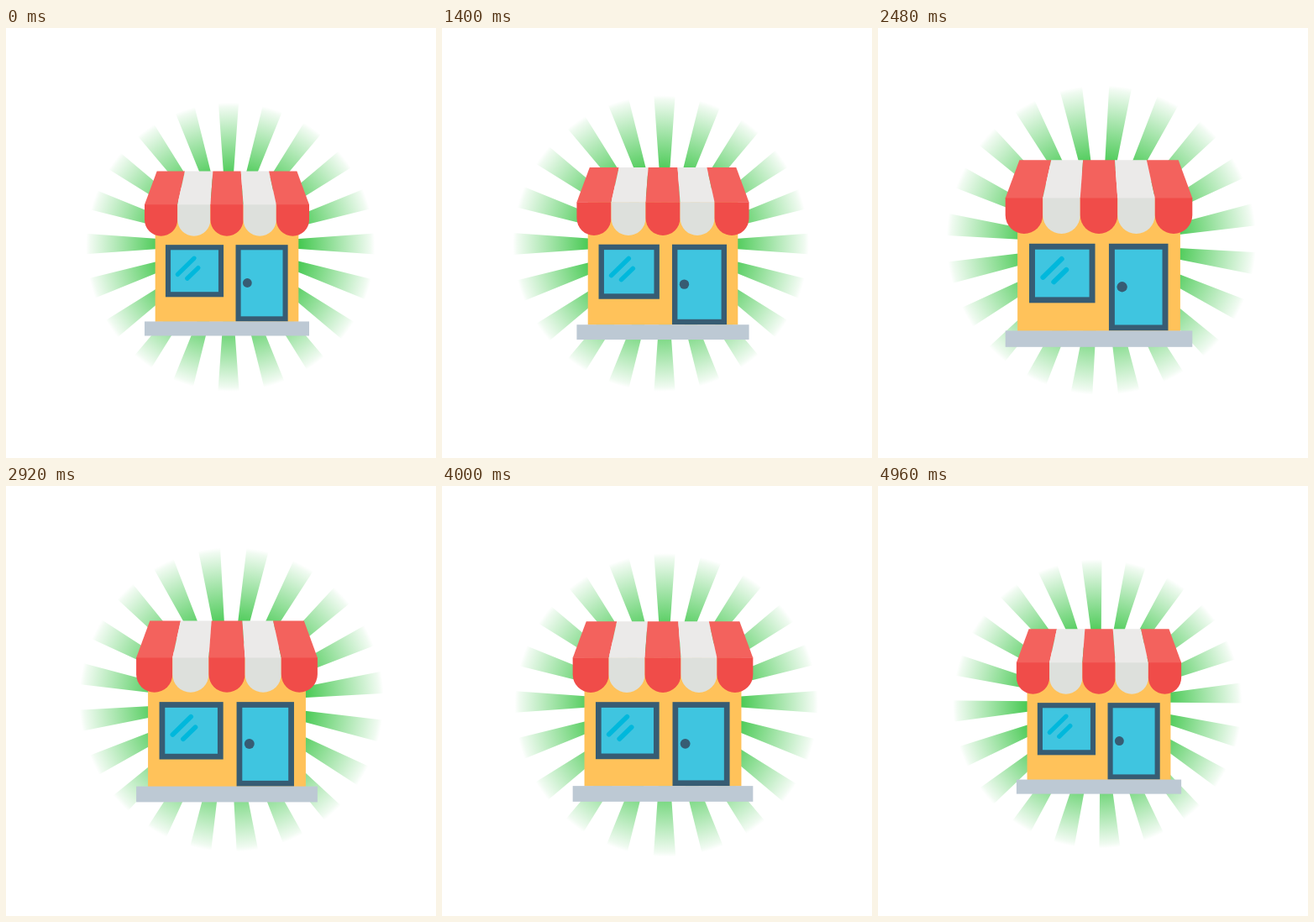
An HTML page with a canvas for the animation above (5000 ms loop, 512 by 512 pixels).

```html
<!DOCTYPE html>
<html lang="en">
<head>
<meta charset="utf-8">
<title>Shop</title>
<style>
  html, body { margin: 0; width: 100%; height: 100%; overflow: hidden; background: #fff; }
  canvas { display: block; width: 100vmin; height: 100vmin; }
</style>
</head>
<body>
<canvas id="stage" width="512" height="512"></canvas>
<script>
const ctx = document.getElementById('stage').getContext('2d');
const LOOP = 5000, STEP = 40;
const PIVOT = { x: 265, y: 257 };
const SHOP = { x: 263, y: 268.5, unit: 224 };
const PULSE_KEYS = [0, 868, 1736, 2604, 3472, 4340, 5000];
const RAYS = 20, RAY_HALF = 4.1 * Math.PI / 180;
const FRAME = '#375c73', GLASS = '#3fc5e0', SHINE = '#00b8dc';

// Swings between 0 and 1, eased at every key.
function pulse(t) {
  let i = 0;
  while (t >= PULSE_KEYS[i + 1]) i++;
  const k = (t - PULSE_KEYS[i]) / (PULSE_KEYS[i + 1] - PULSE_KEYS[i]);
  const eased = (1 - Math.cos(Math.PI * k)) / 2;
  return i % 2 ? 1 - eased : eased;
}

function rect(color, x, y, w, h) {
  ctx.fillStyle = color;
  ctx.fillRect(x, y, w, h);
}

function shape(color, trace) {
  ctx.fillStyle = color;
  ctx.beginPath();
  trace();
  ctx.fill();
}

function line(x1, y1, x2, y2) {
  ctx.beginPath();
  ctx.moveTo(x1, y1);
  ctx.lineTo(x2, y2);
  ctx.stroke();
}

function drawRays(angle, radius) {
  ctx.save();
  ctx.translate(PIVOT.x, PIVOT.y);
  ctx.rotate(angle);
  // The fade sits slightly off the pivot, so it orbits while turning.
  const fade = ctx.createRadialGradient(2.2, 3.8, 0, 2.2, 3.8, radius);
  fade.addColorStop(0.45, 'rgba(60,198,72,1)');
  fade.addColorStop(0.97, 'rgba(60,198,72,0.08)');
  fade.addColorStop(1, 'rgba(60,198,72,0)');
  shape(fade, () => {
    for (let i = 0; i < RAYS; i++) {
      const a = i * 2 * Math.PI / RAYS;
      ctx.moveTo(0, 0);
      for (const edge of [a - RAY_HALF, a + RAY_HALF]) {
        ctx.lineTo(220 * Math.cos(edge), 220 * Math.sin(edge));
      }
      ctx.closePath();
    }
  });
  ctx.restore();
}

function drawAwning() {
  const low = 44.8, high = 38.1, inset = 16.8, fold = 45.5;
  for (let i = 0; i < 5; i++) {
    const red = i % 2 === 0;
    const x = i * low, top = inset + i * high;
    shape(red ? '#f04c49' : '#dde0dc', () => {
      ctx.moveTo(x, fold - 0.5);
      ctx.lineTo(x + low, fold - 0.5);
      ctx.arc(x + low / 2, 66, low / 2, 0, Math.PI);
      ctx.closePath();
    });
    shape(red ? '#f3625d' : '#ebeae9', () => {
      ctx.moveTo(top, 0);
      ctx.lineTo(top + high, 0);
      ctx.lineTo(x + low, fold);
      ctx.lineTo(x, fold);
      ctx.closePath();
    });
  }
}

function drawPane(x, y, w, h) {
  rect(FRAME, x, y, w, h);
  rect(GLASS, x + 7, y + 7, w - 14, h - 14);
}

function drawShop(size) {
  ctx.save();
  ctx.translate(SHOP.x, SHOP.y);
  ctx.scale(size / SHOP.unit, size / SHOP.unit);
  ctx.translate(-SHOP.unit / 2, -SHOP.unit / 2);

  rect('#ffc25a', 14.5, 45, 195, 160);
  drawPane(28.5, 100.2, 79, 71);
  drawPane(124, 100.2, 71, 104.3);
  rect('#bdc9d4', 0, 204.5, 224, 19.5);
  shape(FRAME, () => ctx.arc(139.8, 152, 6.2, 0, 2 * Math.PI));

  ctx.strokeStyle = SHINE;
  ctx.lineWidth = 6;
  ctx.lineCap = 'round';
  line(45, 140.5, 67.5, 118.5);
  line(58, 146, 73, 131.5);

  drawAwning();
  ctx.restore();
}

function render(now) {
  const t = Math.floor((now % LOOP) / STEP) * STEP;
  const p = pulse(t);
  ctx.fillStyle = '#fff';
  ctx.fillRect(0, 0, 512, 512);
  drawRays(t / 4000 * 2 * Math.PI, 172 + 13 * p);
  drawShop(196 + 28 * p);
}

let start = null;
function tick(now) {
  if (start === null) start = now;
  render(now - start);
  requestAnimationFrame(tick);
}
render(0);
requestAnimationFrame(tick);
</script>
</body>
</html>
```
